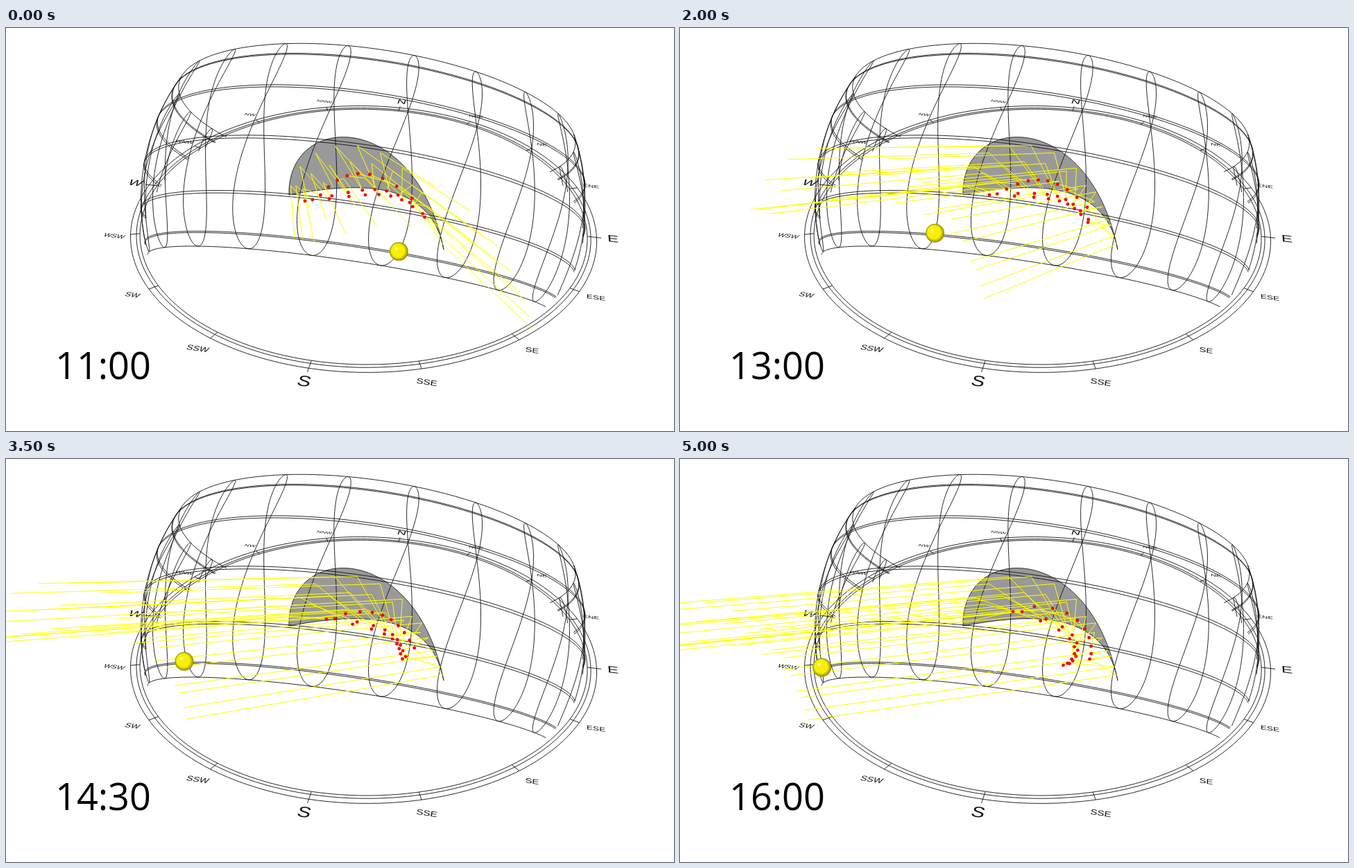
An HTML page with a canvas for the animation above (5500 ms loop, 963 by 582 pixels).

```html
<!DOCTYPE html>
<html>
<head>
<meta charset="utf-8">
<style>
html, body { margin: 0; width: 100%; height: 100%; overflow: hidden; background: #fff; }
canvas { display: block; }
</style>
</head>
<body>
<canvas id="stage" width="963" height="582"></canvas>
<script>
const g = document.getElementById('stage').getContext('2d');
const RAD = Math.PI / 180;
const LAT = 41.5 * RAD;

// Homogeneous screen vectors of the east, north, up axes and the origin
const EAST = [289.6, 26.3, -0.0387];
const NORTH = [166.4, -118.3, 0.206];
const UP = [-94, -294, -0.18];
const ORIGIN = [516, 263, 1];

const axes = ([e, n, z]) => EAST.map((v, i) => v * e + NORTH[i] * n + UP[i] * z);
const flat = ([x, y, w]) => [x / w, y / w];
const project = p => flat(axes(p).map((v, i) => v + ORIGIN[i]));
const ground = (az, r) => [r * Math.sin(az * RAD), r * Math.cos(az * RAD), 0];

const range = (n, f) => Array.from({ length: n }, (_, i) => f(i));
const mix = (a, b, t) => a.map((v, i) => v + (b[i] - v) * t);

function line(points) {
  g.beginPath();
  points.forEach(p => g.lineTo(p[0], p[1]));
  g.stroke();
}

function ball([x, y], r, light, main, dark) {
  const shade = g.createRadialGradient(x - r * 0.35, y - r * 0.35, 0, x, y, r);
  shade.addColorStop(0, light);
  shade.addColorStop(0.25, main);
  shade.addColorStop(0.7, main);
  shade.addColorStop(1, dark);
  g.fillStyle = shade;
  g.beginPath();
  g.arc(x, y, r, 0, 7);
  g.fill();
}

// Point on a cubic curve given as x, y of its four control points
function curve(c, u) {
  const v = 1 - u;
  const at = k => v * v * v * c[k] + 3 * v * v * u * c[k + 2] + 3 * v * u * u * c[k + 4] + u * u * u * c[k + 6];
  return [at(0), at(1)];
}

const declination = day => 23.45 * RAD * Math.sin(2 * Math.PI * (284 + day) / 365);

function skyPoint(dec, angle) {
  const c = Math.cos(dec), s = Math.sin(dec);
  return [
    -0.98 * c * Math.sin(angle),
    0.98 * (Math.cos(LAT) * s - Math.sin(LAT) * c * Math.cos(angle)),
    Math.sin(LAT) * s + Math.cos(LAT) * c * Math.cos(angle)
  ];
}

// Sun position with the equation of time
function sunAt(day, hour) {
  const b = 2 * Math.PI * (day - 81) / 365;
  const minutes = 9.87 * Math.sin(2 * b) - 7.53 * Math.cos(b) - 1.5 * Math.sin(b);
  return skyPoint(declination(day), (15 * (hour - 12) + minutes / 4) * RAD);
}

function drawCompass() {
  g.strokeStyle = g.fillStyle = '#111';
  g.lineWidth = 0.9;
  for (const r of [1, 1.015, 1.04]) line(range(181, i => project(ground(i * 2, r))));

  const names = 'N NNE NE ENE E ESE SE SSE S SSW SW WSW W WNW NW NNW'.split(' ');
  g.font = '100px "Liberation Sans", Arial, sans-serif';
  g.textAlign = 'center';
  g.textBaseline = 'middle';
  names.forEach((name, i) => {
    const az = i * 22.5, major = i % 4 === 0;
    line([project(ground(az, 1)), project(ground(az, major ? 1.06 : 1.04))]);
    // Lay the label on the ground plane
    const [e, n] = ground(az, 1.11), d = 0.01, k = (major ? 0.072 : 0.037) / 100 / d;
    const [x, y] = project([e, n, 0]);
    const [ex, ey] = project([e + d, n, 0]);
    const [nx, ny] = project([e, n + d, 0]);
    g.setTransform((ex - x) * k, (ey - y) * k, (x - nx) * k, (y - ny) * k, x, y);
    g.fillText(name, 0, 0);
    g.resetTransform();
  });
}

function drawSunPaths() {
  g.strokeStyle = '#111';
  g.lineWidth = 0.9;
  for (let month = 0; month < 12; month++) {
    const dec = declination(21 + month * 30.4);
    const half = Math.acos(-Math.tan(LAT) * Math.tan(dec));
    line(range(91, i => project(skyPoint(dec, half * (i / 45 - 1)))));
  }
  // Yearly loop of each clock hour, above the horizon only
  for (let hour = 4; hour <= 20; hour++) {
    let run = [];
    for (let day = 0; day <= 366; day += 3) {
      const p = sunAt(day, hour);
      if (p[2] >= 0) run.push(project(p));
      else { line(run); run = []; }
    }
    line(run);
  }
}

// Mirror edges
const OUTER = [408, 241, 405, 122, 590, 115, 631, 320];
const INNER = [408, 241, 500, 224, 612, 215, 631, 320];

// Curves of the reflected ends, for the upper and lower edge, in the morning and evening
const UPPER_AM = [415, 251, 540, 243, 555, 220, 615, 285];
const UPPER_PM = [460, 215, 620, 255, 560, 300, 550, 298];
const LOWER_AM = [445, 252, 475, 210, 520, 185, 590, 250];
const LOWER_PM = [485, 215, 590, 200, 600, 275, 590, 290];

function drawMirror() {
  g.fillStyle = '#999';
  g.strokeStyle = '#222';
  g.lineWidth = 0.9;
  g.beginPath();
  g.moveTo(...OUTER.slice(0, 2));
  g.bezierCurveTo(...OUTER.slice(2));
  g.bezierCurveTo(...INNER.slice(4, 6), ...INNER.slice(2, 4), ...INNER.slice(0, 2));
  g.fill();
  g.stroke();
}

function drawRays(sun, hour) {
  const dir = axes(sun);
  dir[0] -= 7;
  const late = ((hour - 11) / 5) ** 1.3;
  const upper = mix(UPPER_AM, UPPER_PM, late);
  const lower = mix(LOWER_AM, LOWER_PM, late);
  const dots = [];
  g.strokeStyle = '#ff0';
  g.lineWidth = 1;
  for (let row = 0; row < 3; row++) {
    for (let col = 0; col < 9; col++) {
      const u = (col + 0.4 + 0.2 * row) / 9, v = row / 2;
      const hit = mix(curve(OUTER, u), curve(INNER, u), 0.15 + 0.65 * v);
      const start = flat([...hit, 1].map((c, i) => c + dir[i] * 1.39));
      const end = mix(curve(upper, u), curve(lower, u), v * v);
      line([start, hit, end]);
      dots.push(end);
    }
  }
  for (const p of dots) ball(p, 2.4, '#ff3a20', '#f00', '#b00');
}

function drawClock(hour) {
  g.fillStyle = '#000';
  g.font = '54px "Open Sans", "Noto Sans", sans-serif';
  g.textAlign = 'left';
  g.textBaseline = 'alphabetic';
  g.fillText(Math.floor(hour) + (hour % 1 ? ':30' : ':00'), 71, 507);
}

function draw(hour) {
  g.fillStyle = '#fff';
  g.fillRect(0, 0, 963, 582);
  drawMirror();
  drawCompass();
  drawSunPaths();
  const sun = sunAt(22, hour);
  drawRays(sun, hour);
  ball(project(sun), 13.5, '#fffff0', '#f8f000', '#8c8600');
  drawClock(hour);
}

let shown = -1;
function tick(now) {
  const step = Math.floor(now % 5500 / 500);
  if (step !== shown) draw(11 + step / 2);
  shown = step;
  requestAnimationFrame(tick);
}
tick(0);
</script>
</body>
</html>
```
